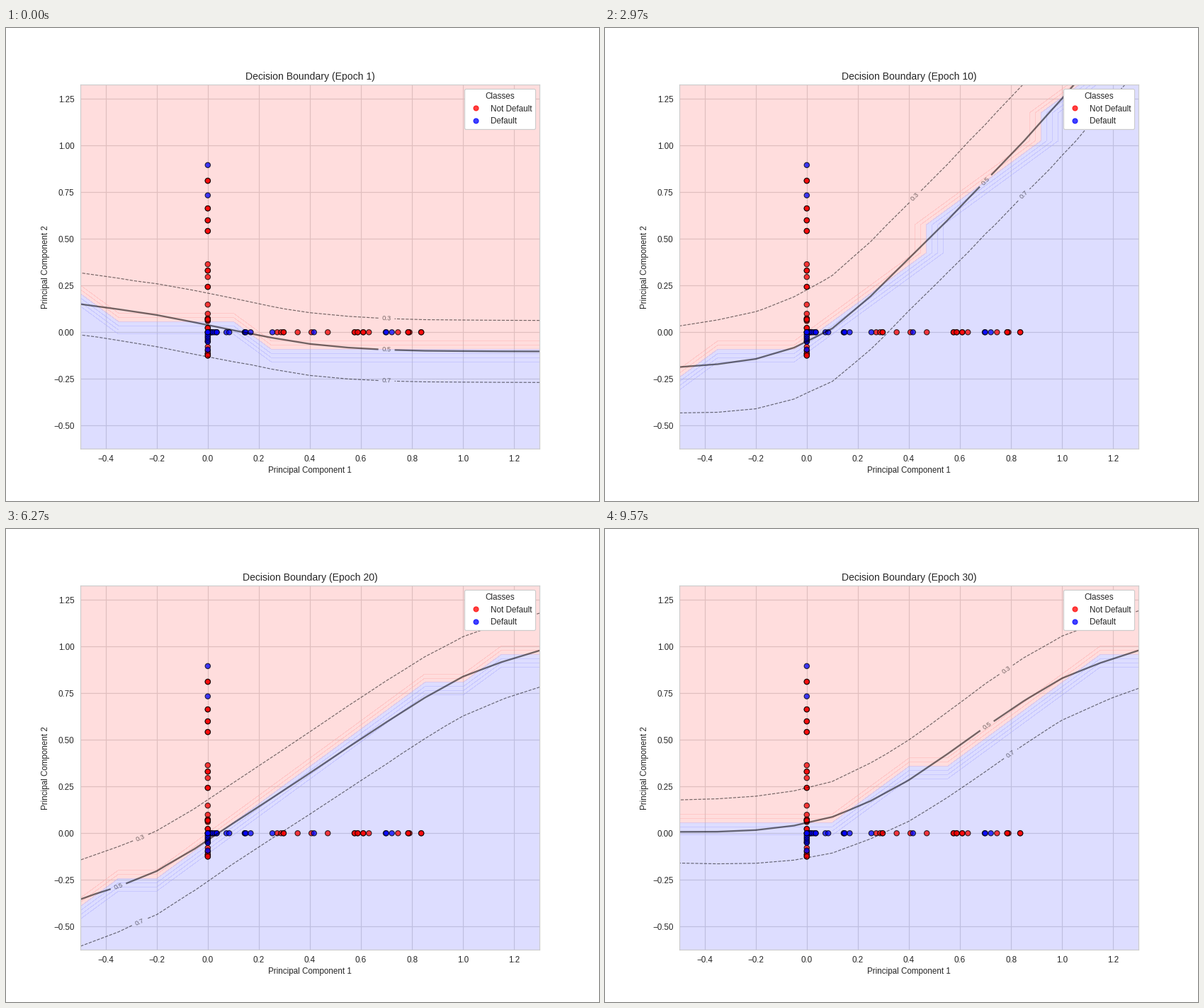
A matplotlib script that plays this animation: 837 by 669 pixels, repeating every 9.9 s.

```python
import numpy as np
import matplotlib.pyplot as plt
from matplotlib.animation import FuncAnimation
from matplotlib.colors import ListedColormap

DPI = 83.7
EPOCHS = 30
LOGIT = np.log(7 / 3)  # log-odds of 0.7

plt.rcParams.update({
    "font.family": "Liberation Sans",
    "text.color": "0.15", "axes.labelcolor": "0.15",
    "xtick.color": "0.15", "ytick.color": "0.15",
    "xtick.bottom": False, "ytick.left": False,
    "axes.edgecolor": "0.8", "axes.linewidth": 1,
    "axes.grid": True, "axes.axisbelow": True,
    "grid.color": "0.8", "grid.linewidth": 1,
})

FILL = ListedColormap(["#FFAAAA", "#AAAAFF"])
DOTS = ListedColormap(["#FF0000", "#0000FF"])

xs = -0.5 + 0.15 * np.arange(13)
ys = -0.625 + 0.15 * np.arange(14)
X, Y = np.meshgrid(xs, ys)


def refine(v):
    """Catmull-Rom midpoints: n values become 2n - 1."""
    v = np.asarray(v, float)
    p = np.r_[2 * v[0] - v[1], v, 2 * v[-1] - v[-2]]
    out = np.empty(2 * len(v) - 1)
    out[::2] = v
    out[1::2] = (9 * (p[1:-2] + p[2:-1]) - p[:-3] - p[3:]) / 16
    return out


def band(mid, up, down):
    """Log-odds around a curve, from the gaps to the 0.3 and 0.7 lines."""
    gap = refine(mid) - Y
    up, down = (refine(refine(w)) for w in (up, down))
    return LOGIT * np.where(gap < 0, gap / up, gap / down)


def softmax(a, b, t):
    return t * np.logaddexp(a / t, b / t)


def saddle():
    """Two red regions, upper left and bottom, split by a blue ridge."""
    d = Y - 0.425
    edge = 0.215 + 0.44 * d - 0.17 * d * d
    top = softmax((0.028 - Y) / 0.2, (X - edge) / 0.2, 0.6)
    low = softmax((0.287 - X) / 0.26, (Y + 0.3 + 0.55 * (X - 0.55)) / 0.28, 0.6)
    return -softmax(-top, -low, 0.4)


KEYS = {
    1: band([.150, .093, .010, -.062, -.094, -.101, -.1025],
            [.163, .166, .162, .160], [.163, .166, .161, .161]),
    6: saddle(),
    10: band([-.185, -.142, .020, .394, .807, 1.25, 1.75],
             [.214, .282, .303, .320], [.244, .280, .277, .330]),
    14: band([.039, .058, .160, .398, .7255, 1.09, 1.50],
             [.163, .193, .245, .300], [.163, .182, .240, .350]),
    20: band([-.349, -.200, .054, .322, .595, .839, .977],
             [.202, .216, .218, .201], [.255, .216, .220, .190]),
    24: band([-.024, .012, .160, .481, .871, 1.33, 1.90],
             [.172, .221, .292, .320], [.168, .208, .265, .310]),
    30: band([.0065, .016, .088, .285, .570, .830, .977],
             [.1665, .189, .227, .212], [.1645, .189, .236, .197]),
}
MARKS = sorted(KEYS)

# Samples lie on the two axes; "twice" ones overlap and look darker.
V_RED = [.364, .296, .148, .099, .06, -.078, -.1]
V_RED_TWICE = [.811, .663, .599, .542, .33, .243, .073, .067, .023, -.115, -.125]
V_BLUE = [.895, .733, -.093, -.05, -.05, -.04, -.03, -.022, -.012, 0, 0, 0]
H_RED = [.005, .012, .272, .287, .352, .406, .470, .631, .745, .790]
H_RED_TWICE = [.297, .575, .587, .609, .785, .836]
H_BLUE = [.004, .009, .015, .02, .027, .035, .035, .073, .084, .145, .145,
          .149, .168, .253, .416, .697, .699, .721]


def samples():
    v = V_RED + V_RED_TWICE * 2
    h = H_RED + H_RED_TWICE * 2
    px = [0] * len(v) + h + H_BLUE + [0] * len(V_BLUE)
    py = v + [0] * (len(h) + len(H_BLUE)) + V_BLUE
    label = [0] * (len(v) + len(h)) + [1] * (len(H_BLUE) + len(V_BLUE))
    return px, py, label


PX, PY, LABEL = samples()


def probability(epoch):
    i = min(np.searchsorted(MARKS, epoch, side="right"), len(MARKS) - 1)
    a, b = MARKS[i - 1], MARKS[i]
    t = (epoch - a) / (b - a)
    return 1 / (1 + np.exp(-((1 - t) * KEYS[a] + t * KEYS[b])))


fig, ax = plt.subplots(figsize=(837.01 / DPI, 669.01 / DPI), dpi=DPI)


def draw(frame):
    epoch = frame + 1
    prob = probability(epoch)
    ax.clear()
    ax.contourf(X, Y, (prob > 0.5).astype(float), cmap=FILL, alpha=0.4)
    lines = ax.contour(X, Y, prob, levels=[0.3, 0.5, 0.7], colors="k",
                       linestyles=["--", "-", "--"], linewidths=[1, 2, 1],
                       alpha=0.55)
    dots = ax.scatter(PX, PY, c=LABEL, cmap=DOTS, s=40, edgecolor="k",
                      linewidth=1, alpha=0.75)
    ax.set_xlim(xs[0], xs[-1])
    ax.set_ylim(ys[0], ys[-1])
    ax.clabel(lines, inline=True, fontsize=8, fmt="%.1f")
    ax.set_title(f"Decision Boundary (Epoch {epoch})")
    ax.set_xlabel("Principal Component 1")
    ax.set_ylabel("Principal Component 2")
    ax.legend(dots.legend_elements()[0], ["Not Default", "Default"],
              title="Classes", loc="upper right", framealpha=1)
    return []


anim = FuncAnimation(fig, draw, frames=EPOCHS, init_func=lambda: [],
                     interval=330, repeat=True, repeat_delay=0)
plt.show()
```
